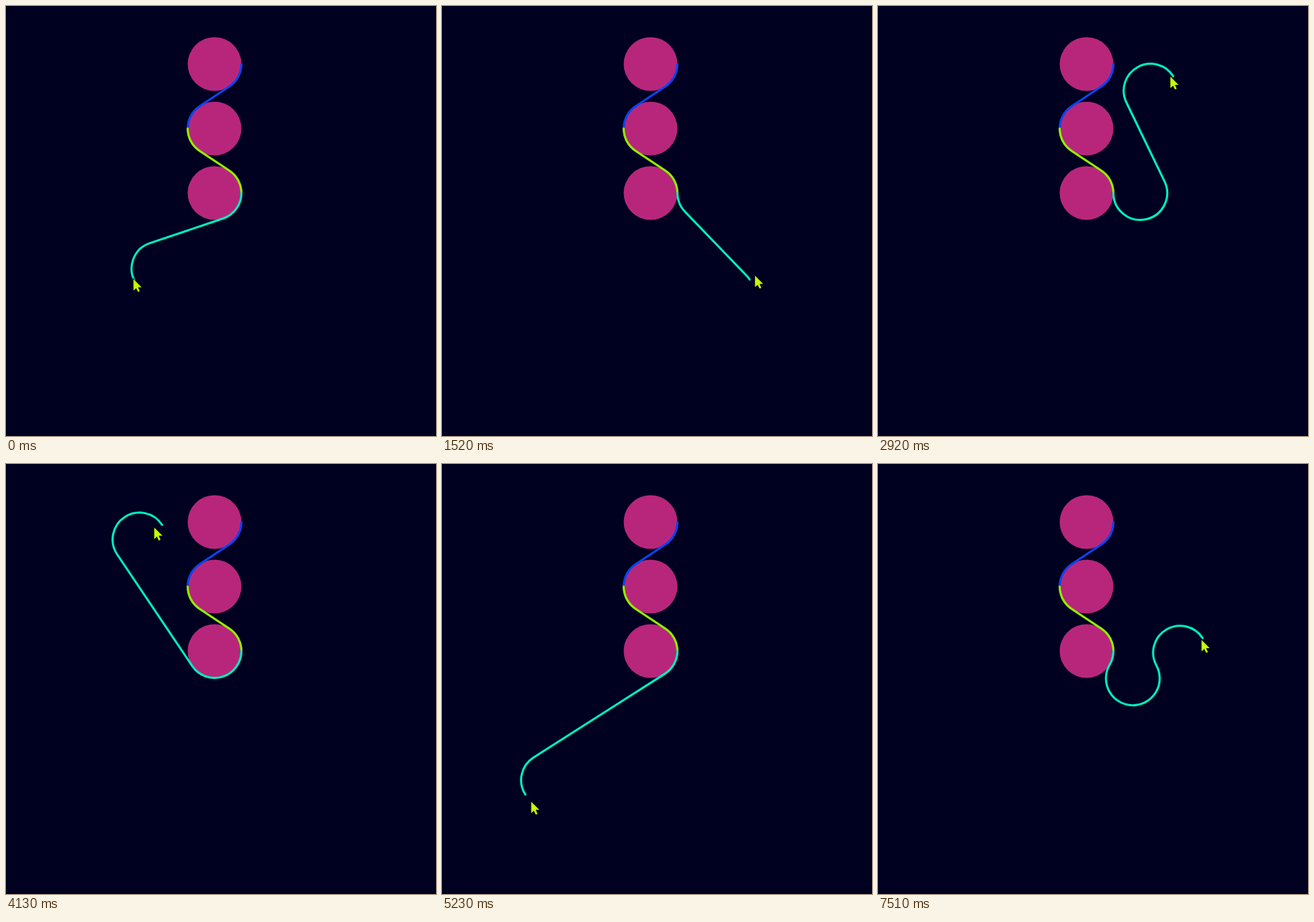
These frames come from a looping animation (600x600 px, 7530 ms). An HTML page:

```html
<!DOCTYPE html>
<html lang="en">
<head>
<meta charset="utf-8">
<title>Shortest curves</title>
<style>
  html, body { margin: 0; width: 100%; height: 100%; overflow: hidden; background: #000020; }
  svg { display: block; width: 600px; height: 600px; }
  .curve { fill: none; stroke-width: 3; stroke-linecap: round; }
</style>
</head>
<body>
<svg viewBox="0 0 600 600">
  <g fill="#b8267c">
    <circle cx="291" cy="81" r="37.5"/>
    <circle cx="291" cy="171" r="37.5"/>
    <circle cx="291" cy="261" r="37.5"/>
  </g>
  <path id="upper" class="curve" stroke="#0845f0"/>
  <path id="lower" class="curve" stroke="#92f000"/>
  <path id="live" class="curve" stroke="#00f0c4"/>
  <path id="pointer" d="M0 0V16L3.7 12.6L6.4 18L8.8 17L6.3 11.4H11.3Z"
        fill="#c4ff00" stroke="#000020" stroke-width="1.5" paint-order="stroke"/>
</svg>
<script>
const R = 37.5, TAU = 2 * Math.PI, DOWN = Math.PI / 2;
const LOOP = 7530, LEAD = 25;
const el = id => document.getElementById(id);

const wrap = a => {
  const m = ((a % TAU) + TAU) % TAU;
  return m > TAU - 1e-6 ? 0 : m;
};
const pose = (x, y, h) => ({ x, y, h });

// Centre of the turning circle; turn is 1 for clockwise, -1 for the other way.
const centre = (p, turn) => ({
  x: p.x - turn * R * Math.sin(p.h),
  y: p.y + turn * R * Math.cos(p.h)
});

// All feasible turn-straight-turn and turn-turn-turn routes, as [turn, amount] steps.
function routes(from, to) {
  const found = [];
  for (const s of [1, -1]) {
    for (const e of [1, -1]) {
      const a = centre(from, s), b = centre(to, e);
      const dx = b.x - a.x, dy = b.y - a.y;
      const d = Math.hypot(dx, dy), dir = Math.atan2(dy, dx);
      if (s === e || d >= 2 * R) {
        const h = s === e ? dir : dir + s * Math.asin(2 * R / d);
        const line = s === e ? d : Math.sqrt(d * d - 4 * R * R);
        found.push([[s, wrap(s * (h - from.h))], [0, line], [e, wrap(e * (to.h - h))]]);
      }
      if (s === e && d <= 4 * R) {
        const bend = Math.acos(d / (4 * R));
        const h1 = dir + s * (bend + DOWN);
        const h2 = dir - s * bend + Math.PI + s * DOWN;
        found.push([
          [s, wrap(s * (h1 - from.h))],
          [-s, wrap(s * (h1 - h2))],
          [s, wrap(s * (to.h - h2))]
        ]);
      }
    }
  }
  return found;
}

const routeLength = route =>
  route.reduce((sum, [turn, n]) => sum + (turn ? n * R : n), 0);

function shortestCurve(from, to) {
  const best = routes(from, to).reduce((a, b) => routeLength(b) < routeLength(a) ? b : a);
  let p = from, d = `M${p.x} ${p.y}`;
  for (const [turn, n] of best) {
    if (turn) {
      const c = centre(p, turn), h = p.h + turn * n;
      p = pose(c.x + turn * R * Math.sin(h), c.y - turn * R * Math.cos(h), h);
      d += `A${R} ${R} 0 ${+(n > Math.PI)} ${+(turn > 0)} ${p.x} ${p.y}`;
    } else {
      p = pose(p.x + n * Math.cos(p.h), p.y + n * Math.sin(p.h), p.h);
      d += `L${p.x} ${p.y}`;
    }
  }
  return d;
}

// Key points of each hand stroke: time, x, y. The hand rests between strokes.
const strokes = [
  [[0, 181.3, 387], [130, 168, 345], [270, 106.5, 299]],
  [[510, 106.5, 299], [850, 170, 408], [1190, 311, 450], [1520, 429, 382],
   [1800, 517, 275], [2400, 472, 154], [2920, 412, 98], [3110, 398, 91]],
  [[3590, 398, 91], [4130, 218.2, 85], [4400, 107, 125], [4800, 20, 300],
   [5230, 116, 461], [5560, 290, 523], [6050, 517, 410], [6610, 541, 278]],
  [[6880, 541, 278], [7080, 590, 268], [7510, 453, 243]]
];

// Smooth curve through the key points, with speeds taken from their neighbours.
function handAt(time) {
  const keys = strokes.filter(s => s[0][0] <= time).pop(), last = keys.length - 1;
  const t = Math.min(time, keys[last][0]);
  const i = Math.max(keys.findIndex(k => k[0] >= t), 1);
  const a = keys[i - 1], b = keys[i], span = b[0] - a[0], u = (t - a[0]) / span;
  const speed = (j, axis) => {
    const p = keys[Math.max(j - 1, 0)], n = keys[Math.min(j + 1, last)];
    return (n[axis] - p[axis]) / (n[0] - p[0]);
  };
  const at = axis => a[axis] + (b[axis] - a[axis]) * u * u * (3 - 2 * u)
    + span * u * (1 - u) * ((1 - u) * speed(i - 1, axis) - u * speed(i, axis));
  return { x: at(1), y: at(2) };
}

const start = pose(328.5, 81, DOWN);
const middle = pose(253.5, 171, DOWN);
const end = pose(328.5, 261, DOWN);
el('upper').setAttribute('d', shortestCurve(start, middle));
el('lower').setAttribute('d', shortestCurve(middle, end));

function draw(time) {
  const t = time % LOOP;
  const tip = handAt(t), mouse = handAt(t + LEAD);
  el('live').setAttribute('d', shortestCurve(end, pose(tip.x, tip.y, 1)));
  el('pointer').setAttribute('transform', `translate(${mouse.x - 1.5} ${mouse.y + 2.5})`);
}

const began = performance.now();
function tick() {
  draw(performance.now() - began);
  requestAnimationFrame(tick);
}
tick();
</script>
</body>
</html>
```
